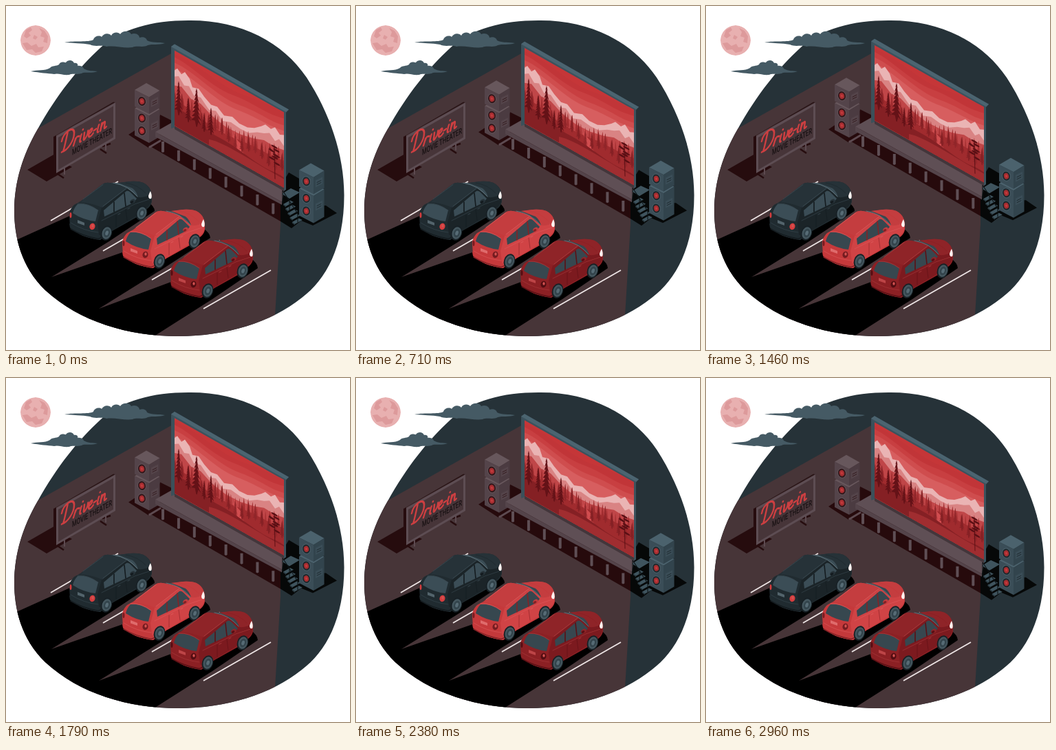
These frames come from a looping animation (500x500 px, 3 s). An HTML page:

```html
<!DOCTYPE html>
<html lang="en">
<head>
<meta charset="utf-8">
<title>Open-air cinema</title>
<style>
html, body { margin: 0; width: 100%; height: 100%; overflow: hidden; background: #fff; }
svg { display: block; width: 100vw; height: 100vh; }
</style>
</head>
<body>
<svg viewBox="0 0 500 500">
<defs>
  <clipPath id="blob"><path id="blobShape" d="M265 21C340 20 402 52 437 104C470 155 491.500 215 491.500 275C491.500 350 465 398 430 424C385 460 320 480 250 480C178 480 107 459 57 413C22 379 12 335 12 298C12 255 25 215 46 179C74 129 104 91 138 60C168 33 213 21 265 21Z"/></clipPath>
  <clipPath id="film"><path d="M0 0H159V109.500H0Z"/></clipPath>
  <clipPath id="disc"><circle cx="43" cy="50" r="22"/></clipPath>
</defs>

<use href="#blobShape" fill="#263238"/>
<g clip-path="url(#blob)">
  <path fill="#473538" d="M242 68L0 204V500H388L399 318V157Z"/>
  <path d="M0 347L95 304L130 280L205 284Q216 291 216 298L150 342L66 394L178 355L285 322Q297 330 297 337L228 382L135 440L248 398L355 366Q366 374 366 381L300 426L212 482H0Z"/>
</g>
<path stroke="#eee6e6" stroke-width="1.8" d="M65 312L163 255M141 356L240 299M212 398L311 341M287 440L385 384"/>

<g clip-path="url(#disc)">
  <circle cx="43" cy="50" r="22" fill="#e8b0b0"/>
  <path fill="#dd9a9b" d="M29 35L36 31L38 35L33 39L36 43L30 47L26 44ZM48 32L56 36L61 44L60 54L54 52L56 46L50 44L52 38ZM24 54L31 53L37 58L44 55L47 60L55 59L52 66L43 68L38 63L30 64ZM41 42L46 45L43 49L39 47Z"/>
</g>
<g fill="#455a64">
  <path d="M85 53C100 50 120 53 127 49C128 44 136 42 139 45C142 39 150 39 153 43C156 37 164 38 166 41C170 35 180 36 182 41C188 38 194 42 194 46C199 44 204 46 205 50C212 54 222 52 231 54C222 57 212 55 206 57C200 61 190 57 184 60C172 62 158 57 146 59C138 56 130 60 122 56C110 54 98 54 85 53Z"/>
  <path d="M36 95C46 92 56 95 64 90C67 86 73 88 77 85C80 79 86 83 87 82C90 78 97 78 99 83C104 82 105 86 104 87C110 86 113 90 113 91C120 95 126 94 133 95C124 98 118 96 112 97C104 101 98 97 92 100C82 101 76 97 70 99C60 98 50 97 36 95Z"/>
</g>

<g id="sign">
  <path fill="#260c0e" d="M31 238L71 215L73 242L92 232L96 234L59 255ZM69 190L73 188V243L69 240Z"/>
  <path stroke="#260c0e" stroke-width="2.5" d="M75 244L84 250M137 208L146 214M140 204L152 200"/>
  <path stroke="#5d4a50" stroke-width="2" d="M85 235V245M145 200V210"/>
  <path fill="#5d4d53" d="M73 189L159 140V193L73 243Z"/>
  <path fill="#473539" d="M76 191L156 145.500V191L76 238Z"/>
  <path fill="#2a1517" d="M69 190L73 188L159 140L156 139.500Z"/>
  <g aria-label="Drive-in" transform="matrix(1.06 -.583 0 1.12 80 214)" fill="none" stroke="#cd3f41" stroke-width="2.500" stroke-linecap="round" stroke-linejoin="round">
    <path d="M9 -22C7 -14 5 -6 3 -1M1 -15C2 -25 18 -28 18 -17C18 -8 10 1 1 -1M20 -9L17 -1M19 -6C21 -10 22 -11 25 -9M28 -10C26 -5 25 -1 27 -1M30 -15L30.100 -15.200M32 -10C32 -5 30 -1 32 -1C35 -3 37 -7 37 -10M39 -5C43 -6 44 -11 41 -10C38 -9 36 -1 40 -1C42 -1 43 -2 44 -3M45 -6L48 -6.500M52 -10C50 -5 49 -1 51 -1M53.500 -15L53.600 -15.200M56 -10L54 -1M55 -5C58 -11 61 -11 60 -7C59 -2 59 0 62 -2"/>
  </g>
  <text transform="matrix(.64 -.352 0 1 96 217)" font-family="Roboto, 'Liberation Sans', sans-serif" font-size="12" font-weight="500" fill="#171012">MOVIE THEATER</text>
</g>

<g id="stage"></g>
<g id="cars"></g>
</svg>

<script>
const $ = id => document.getElementById(id);
const path = (d, fill, extra = '') => `<path d="${d}" fill="${fill}" ${extra}/>`;
const stroke = (d, color, width) => path(d, 'none', `stroke="${color}" stroke-width="${width}" stroke-linecap="round"`);
const oval = (x, y, rx, ry, fill, turn = 0) =>
  `<ellipse rx="${rx}" ry="${ry}" fill="${fill}" transform="translate(${x} ${y}) rotate(${turn})"/>`;

// Pine with its tip at (x, y): ragged tiers down the right, back up the left
function pine(x, y, h, w, fill) {
  const tiers = 8;
  let left = '', right = '';
  for (let i = 1; i <= tiers; i++) {
    const ty = y + h * .88 * i / tiers, half = w * (.1 + .9 * i / tiers) / 2;
    const out = half * (i % 2 ? 1 : .8), inner = half * .3;
    right += `L${x + out} ${ty + 1}L${x + inner} ${ty - 1}`;
    left = `L${x - inner} ${ty - 1}L${x - half} ${ty + 1}` + left;
  }
  return path(`M${x} ${y}${right}L${x + .6} ${y + h}H${x - .6}${left}Z`, fill);
}

function film() {
  let s = path('M0 0H159V110H0Z', '#c53638');
  s += path('M0 5C40 0 65 16 100 8S140 4 159 -2V110H0Z', '#c13538');
  s += path('M0 10C30 8 50 23 85 17S130 18 159 9V110H0Z', '#c83f41');
  s += path('M0 18C30 14 60 33 95 26S135 26 159 19V110H0Z', '#cf4d4e');
  s += path('M0 26C30 23 60 41 90 35S135 33 159 27V110H0Z', '#d75e5f');
  s += path('M0 29L4 24L10 29L15 23L22 29L26 39L35 36L43 43L53 49L62 47L72 54L84 49L94 53L106 52L116 47L126 39L132 33L140 35L146 29L153 36L159 33V75H0Z', '#eab4b4');
  s += path('M0 38L6 34L14 43L21 40L28 50L38 47L50 58L60 54L70 63L82 58L96 60L108 59L120 51L130 47L138 42L146 49L152 43L159 49V82H0Z', '#d98383');
  s += path('M0 51L10 47L24 57L38 56L55 65L75 69L95 68L115 63L130 57L145 58L159 55V110H0Z', '#c04648');
  for (let i = 0; i < 26; i++) {
    const x = i * 6.3, wob = Math.sin(i * 7.3) * 4;
    s += pine(x, 57 + 5 * Math.sin(x / 45) + wob, 22, 6, i % 2 ? '#a93234' : '#a02b2e');
  }
  s += path('M0 73C22 69 35 79 58 80S90 77 110 75S140 75 159 70V110H0Z', '#a02b2e');
  s += path('M88 69C94 73 84 76 94 80S88 86 103 94L96 95C82 87 89 83 86 79S89 74 86 70Z', '#d14d4f');
  for (let i = 0; i < 17; i++) {
    const x = 1 + i * 9.7;
    s += pine(x, 64 + 5 * Math.sin(i * 5.1) - Math.abs(x - 90) * .04, 25, 8, i % 3 ? '#852024' : '#902529');
  }
  s += path('M0 83C24 78 40 91 65 90S105 95 125 96S145 93 159 95V110H0Z', '#852024');
  s += path('M50 101C75 92 110 98 159 97V110H50Z', '#a02d30');
  for (const [x, y, h, w] of [[6, 41, 50, 13], [20, 57, 36, 10], [32, 37, 56, 16], [53, 53, 40, 11], [43, 66, 28, 8]])
    s += pine(x, y, h, w, '#641217');
  // sparse tree on the right
  s += stroke('M145 57L146 104M145 68L138 63M145 73L153 69', '#5a0f14', 1);
  for (let i = 0; i < 7; i++)
    s += oval(145 + 4 * Math.sin(i * 2.3), 58 + i * 3.8, 4.500, 1.500, '#5a0f14');
  return `<g transform="matrix(1 .566 0 1 245 64.5)"><g clip-path="url(#film)">${s}</g></g>`;
}

function speaker(x, y, [top, front, side, rim, dark]) {
  const box = (y0, h) =>
    path(`M187 ${y0}L204 ${y0 - 10}L223.500 ${y0 + 1}L208 ${y0 + 10.500}Z`, top) +
    path(`M187 ${y0}L208 ${y0 + 10.500}V${y0 + h + 11}L187 ${y0 + h}Z`, front) +
    path(`M208 ${y0 + 10.500}L223.500 ${y0 + 1}V${y0 + h + 2}L208 ${y0 + h + 11}Z`, side);
  let s = box(149, 39) + box(122, 24);
  for (const cy of [138.500, 163, 181.500])
    s += oval(197.500, cy, 6.600, 7.800, rim, -15) + oval(197.500, cy, 5.400, 6.600, dark, -15) +
      oval(197.500, cy, 3.600, 4.500, '#a52d30', -15) + oval(197.500, cy, 1.500, 2, '#c43c3e', -15);
  for (const hy of [140, 174])
    s += path(`M211 ${hy - 3}L221 ${hy - 8}V${hy + 2}L211 ${hy + 7}Z`, front) +
      stroke(`M213 ${hy}L219 ${hy - 3}M213 ${hy + 3}L219 ${hy}`, dark, .900);
  return `<g transform="translate(${x} ${y})">${s}</g>`;
}

function stage() {
  const red = '#260a0c';
  let s = path('M178 187L190 179L212 192L224 158L242 167L399 258V313L208 203L207 206Z', red);
  s += path('M399 262L411 242L428 252V290L465 290L481 301L446 319L429 312L415 323L399 313Z', '#060808');
  s += speaker(0, 0, ['#67575c', '#54444a', '#4b3b41', '#5f4f55', '#30171a']);
  s += stroke('M209 205L224 196', '#5d4a50', 3);
  for (let i = 0; i < 8; i++) {
    const x = 226 + i * 22.900, y = 192 + (x - 217) * .56;
    s += path(`M${x} ${y}h4v15l-2 1l-2 -1Z`, '#5f4f55');
  }
  s += path('M217 183L240 170L405 264L401 285Z', '#5f4f55');
  s += path('M217 183L401 285V289L217 190Z', '#54444a');
  // steps beside the deck
  s += path('M401 273L414 265L427 271L412 280Z', '#3f545e');
  for (let i = 0; i < 5; i++) {
    const x = 403 + i * 3.200, y = 288 + i * 6.500;
    s += path(`M${x} ${y}l10 -5.500l5 2.500l-11 6Z`, '#3f545e') + path(`M${x} ${y}l4 3v1.500l-4 -3Z`, '#2c3c44');
  }
  s += stroke('M402 268L424 302V314M402 268V287M412 284V300', '#0d1417', 1.100);
  s += speaker(239, 116.500, ['#4b626d', '#3a4d57', '#32444d', '#465b65', '#1c272c']);
  // screen frame
  s += path('M240 59L246 66V176L240 178Z', '#3b505a');
  s += path('M245 173L404 263V269L245 179Z', '#43363b');
  s += path('M240 59L245 55.500L411 150.500L407 155V267L404 269V157L245 67Z', '#3c525d');
  s += path('M240 59L245 55.500L411 150.500L407 154Z', '#4b6470');
  return s + film();
}

function car(x, y, [body, roof, side, glass, trim, plate, lamp, edge]) {
  const wheel = (cx, cy) => oval(cx, cy, 8, 11, '#182126', 18) + oval(cx + .300, cy, 6.600, 9, '#45575f', 18) +
    oval(cx + .600, cy, 4.500, 6.500, '#33444c', 18) + oval(cx + .600, cy, 2.200, 3.500, '#566b75', 18);
  const s =
    path('M92 304C92 298 95 293 99 289L108 284L139 260Q144 256 150 257L166 257L180 255Q196 254 203 259C209 263 212 270 212 277V284C211 290 207 294 202 297L190 307L156 326L137 340C118 338 102 331 93 322Z', body) +
    path('M139 293L177 265L193 278L211 274V284Q208 293 199 296L188 306L156 325L136 339L133 315Z', side) +
    path('M162 257L180 255Q196 254 203 259Q210 265 211 273Q202 279 193 278L184 266Z', roof) +
    stroke('M174 257Q192 260 203 272', body, 1) +
    path('M108 285L139 260Q144 256 151 257L172 261Q178 262 176 265L140 293Q123 286 108 285Z', roof) +
    stroke('M112 281L141 259.500M141 291L175 265', edge, .900) +
    path('M152 257L163 257L184 265Q190 270 192 278L177 265Q174 261 152 257Z', glass) +
    stroke('M156 257Q178 261 191 277', '#71848c', .700) +
    path('M104 288Q119 286 134 297L130 313Q112 311 97 301Q99 293 104 288Z', glass) +
    stroke('M104 287Q119 286 134 297', edge, .800) +
    path('M142 297L175 269Q178 268 181 271L190 280L185 286L143 306Z', glass) +
    stroke('M157 285V299M172 272L174 291', trim, 1.600) +
    stroke('M139 312L187 288L208 281', edge, .600) +
    stroke('M160 304V321M174 296L176 311', trim, .600) +
    stroke('M163 303l3 -1.500M177 295l3 -1.500', edge, .900) +
    path('M92 316Q111 330 137 333V340C118 338 102 331 93 322Z', body) +
    stroke('M94 324Q110 334 134 338.500L140 336', trim, 1.500) +
    stroke('M94 315Q113 327 134 329', edge, .600) +
    path('M104 311L114 315V319L104 315.500Z', plate) +
    oval(125.500, 320.500, 4, 4.800, lamp, 15) + oval(126, 319.500, 1.600, 2.200, '#d55250') +
    oval(94, 304, 1.400, 4, lamp) +
    oval(184, 284, 4, 3, roof, -30) + oval(183, 285, 2.500, 1.700, trim, -30) +
    wheel(146, 330) + wheel(197, 301) +
    path('M210 269Q213 276 211 280Q207 281 207 276Q208 272 210 269Z', '#fff3f1');
  return `<g transform="translate(${x} ${y})">${s}</g>`;
}

$('stage').innerHTML = stage();
$('cars').innerHTML =
  car(0, 0, ['#202b30', '#263238', '#1b2428', '#3b4d56', '#141b1f', '#53646c', '#d53d3e', '#3a4a52']) +
  car(77, 41, ['#c5393b', '#c43d3f', '#d04345', '#37474f', '#842226', '#df6b6c', '#751b20', '#de5c5d']) +
  car(147, 84, ['#8c2024', '#8f2428', '#7c1a1f', '#37474f', '#5b1015', '#bd4547', '#510d12', '#ab3b3d']);

const LOOP = 3000, RISE = 8;
function draw(now) {
  const p = now % LOOP / LOOP;
  const lift = RISE * (1 - Math.abs(1 - 2 * p));
  $('stage').setAttribute('transform', `translate(0 ${-lift})`);
  requestAnimationFrame(draw);
}
requestAnimationFrame(draw);
</script>
</body>
</html>
```
